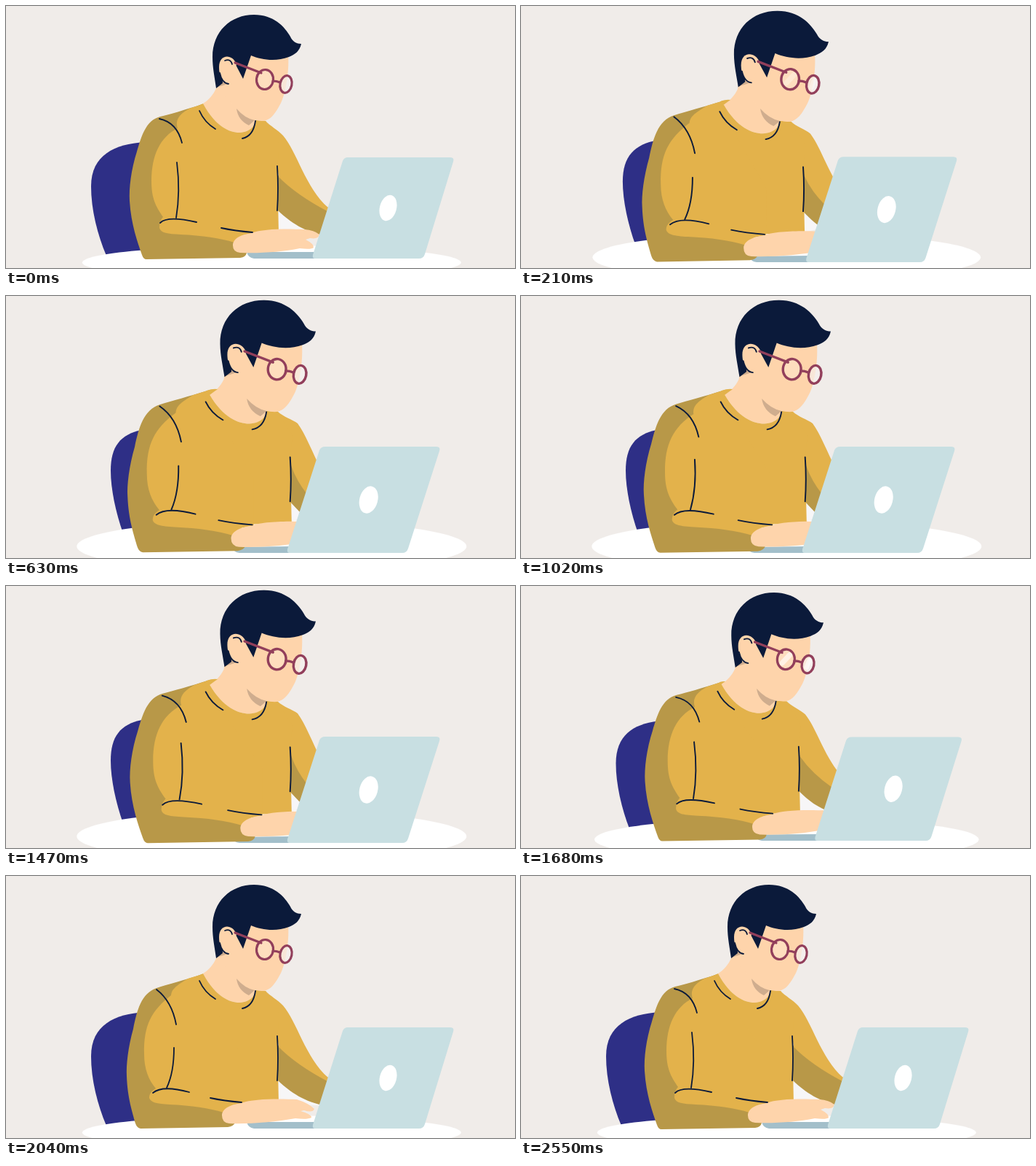
These frames come from a looping animation (700x360 px, 2.7 s). An HTML page with a canvas:

```html
<!DOCTYPE html>
<html lang="en">
<head>
<meta charset="utf-8">
<title>Working at a laptop</title>
<style>
  html, body { margin: 0; width: 100%; height: 100%; overflow: hidden; background: #f0ece9; }
  canvas { display: block; }
</style>
</head>
<body>
<canvas id="stage" width="700" height="360"></canvas>
<script>
const ctx = document.getElementById('stage').getContext('2d');
const LOOP = 2700, STEP = 30;
const SHIRT = '#e3b24b', SHADE = '#b89848', SKIN = '#fed4ab', NAVY = '#0b1a3a',
      CHAIR = '#2e2f86', SCREEN = '#c8dfe2', BASE = '#a3bfca', FRAME = '#923f5b';

const lerp = (a, b, k) => a + (b - a) * k;
const progress = (t, start, length) => Math.min(1, Math.max(0, (t - start) / length));
const smooth = k => k * k * (3 - 2 * k);

// Blend two path strings that share the same commands.
function mix(a, b, k) {
  const target = b.match(/-?[\d.]+/g);
  let i = 0;
  return a.replace(/-?[\d.]+/g, n => lerp(+n, +target[i++], k).toFixed(2));
}

function fill(color, path) {
  ctx.fillStyle = color;
  ctx.fill(new Path2D(path));
}

function line(path, color = NAVY, width = 1.8) {
  ctx.strokeStyle = color;
  ctx.lineWidth = width;
  ctx.stroke(new Path2D(path));
}

function oval(color, x, y, rx, ry, turn = 0, outline) {
  ctx.beginPath();
  ctx.ellipse(x, y, rx, ry, turn, 0, 2 * Math.PI);
  ctx.fillStyle = color;
  ctx.fill();
  if (outline) {
    ctx.strokeStyle = outline;
    ctx.lineWidth = 3.2;
    ctx.stroke();
  }
}

// Draw a part whose transform grows from identity to the given matrix.
function part(matrix, k, draw) {
  ctx.save();
  ctx.transform(...matrix.map((v, i) => lerp([1, 0, 0, 1, 0, 0][i], v, k)));
  draw();
  ctx.restore();
}

const HEAD = [1.08, .012, .015, 1.05, -13.3, -10.9];
const GLASSES = [1, 0, 0, 1, 0, 1.2];
const TORSO = [1.085, 0, 0, 1, -14, 1.4];
const ARM = [1.077, 0, 0, 1.05, -12, -12.15];

// How far the viewpoint has moved in.
function leanAt(t) {
  return t < 1350 ? 1 - (1 - progress(t, 0, 450)) ** 3
                  : 1 - smooth(progress(t, 1470, 420));
}

// How far the near arm is pulled back: [start, length, direction].
const ARM_MOVES = [[0, 150, 1], [600, 150, -1], [900, 240, 1],
                   [1350, 150, -1], [1890, 150, 1], [2400, 150, -1]];
const reachAt = t => ARM_MOVES.reduce(
  (sum, [start, length, dir]) => sum + dir * smooth(progress(t, start, length)), 0);

function drawTorso() {
  fill(SKIN, 'M291 100L289 113C285 122 279 129 271 134C288 166 308 174 321 174C337 173 342 164 343 156L340 110Z');
  fill(SHIRT, 'M244 146L271 134C288 166 308 174 321 174C337 173 342 164 343 157L357 158L376 190L373 220L375 312L215 312L212 200Z');
}

function drawTorsoLines() {
  line('M266 144Q273 160 288 169');
  line('M343 158Q340 179 325 182');
  line('M373 220Q375 250 373 281');
}

function drawHead() {
  fill(SKIN, 'M294 62L388 66C390 90 384 125 376 137C368 152 361 158 352 158Q332 157 317 141L289 112Z');
  fill('#cfad8e', 'M317 141Q328 154 342 157L334 164Q319 157 317 141Z');
  fill('#cfad8e', 'M289 112L297 104L305 107Z');
  fill(NAVY, 'M289 113C287 98 284 85 284 70C284 35 309 12 341 12C368 12 383 28 391 42C394 49 400 52 406 52C404 62 397 67 389 70C371 77 351 74 337 68L326 100L315 79L297 85L298 106Z');
  fill(SKIN, 'M317 80C311 65 293 66 293 84C293 97 298 107 307 107Z');
  line('M301 75Q309 72 311 80');
  line('M294 92Q297 106 306 107');
}

function drawGlasses(glint) {
  oval('rgba(255,236,212,.45)', 356, 101, 11.5, 13.5, .12, FRAME);
  oval('rgba(245,240,236,.7)', 385, 107.5, 8, 12, .2, FRAME);
  const shine = `rgba(255,255,255,${.6 * glint})`;
  line('M351 106L361 95', shine, 7);
  line('M383 112L387 102', shine, 6);
  line('M315 78L351 92', FRAME, 3.2);
  line('M367 103Q372 103 377 105', FRAME, 3.2);
}

function drawFarArm(lean) {
  fill('#f7f6f7', mix('M374 280L440 316L374 312Z', 'M391 282L410 303L391 311Z', lean));
  fill(SHADE, mix('M373 232L443 277L440 316C410 310 392 298 374 281Z',
                  'M390 230L432 240L415 306C407 300 399 292 391 283Z', lean));
  fill(SHIRT, mix('M343 157L357 158C362 164 375 171 381 178C400 200 412 250 443 277L442 282Q400 260 375 235L373 220Z',
                  'M358 158L374 159C380 165 394 170 401 175C412 190 420 212 433 238L414 272Q400 255 392 233L390 219Z', lean));
}

function drawNearArm(reach) {
  const pose = (near, back) => mix(near, back, reach);
  fill(SHADE, pose(
    'M270 135C245 143 225 149 212 152C192 157 186 180 180 200C172 225 169 250 170 268C172 300 181 325 187 342Q189 348 193 348L322 346Q330 345 331 339L320 330L320 310L250 240Z',
    'M270 135C245 143 222 149 207 154C186 161 180 185 175 210C168 235 165 260 166 275C167 305 174 325 178 340Q180 346 185 347L305 345Q313 344 315 339L305 330L305 310L250 240Z'));
  fill(SHIRT, pose(
    'M252 141C236 150 233 158 236 168C212 180 200 205 200 240C200 265 206 275 216 290C212 294 211 300 211 305C213 312 222 313 240 314Q285 316 314 325L326 315L340 312L340 250L270 150L270 135Z',
    'M250 141C232 152 228 156 227 164C200 185 189 205 190 245C190 265 196 280 206 292C199 296 197 300 197 305C199 311 207 313 225 314Q270 316 299 325L311 315L326 312L326 250L270 150L270 135Z'));
  fill(SKIN, pose(
    'M312 329C312 319 324 314 338 312C352 306 385 306 410 307Q424 308 431 314Q430 321 418 319L412 321Q424 327 423 332Q420 335 404 333C380 338 350 340 322 339Q312 338 312 329Z',
    'M297 329C297 319 310 314 324 312C338 306 375 306 400 307Q416 312 424 320Q422 326 410 322L405 323Q420 327 420 332Q414 335 398 333C370 338 335 341 307 340Q297 339 297 329Z'));
  line(pose('M211 155Q235 160 242 188', 'M207 156Q228 172 234 204'));
  line(pose('M235 215Q240 255 234 291', 'M231 236Q231 270 221 291'));
  line(pose('M212 298Q222 288 262 297', 'M202 298Q215 287 252 297'));
  line(pose('M296 305Q315 309 339 311', 'M281 305Q300 309 324 311'));
}

function drawScreen(lean) {
  fill(SCREEN, mix('M470 208L611 208Q617 208 615 214L576 341Q574 347 568 347L425 347Q421 347 422 342L463 213Q465 208 470 208Z',
                   'M439 207L592 207Q598 207 596 213L553 347Q551 353 545 353L390 353Q386 353 387 348L431 212Q433 207 439 207Z', lean));
  oval('#fff', lerp(525.5, 498.7, lean), lerp(277.5, 280, lean),
       lerp(11.5, 12.5, lean), lerp(18, 19, lean), .26);
}

function draw(t) {
  const lean = leanAt(t), reach = reachAt(t);
  ctx.fillStyle = '#f0ece9';
  ctx.fillRect(0, 0, 700, 360);
  ctx.lineCap = 'round';
  fill(CHAIR, mix('M190 187C150 190 117 204 117 248C117 280 126 315 138 343L200 343Z',
                  'M187 184C157 190 144 207 144 240C144 265 151 298 161 326L200 326Z', lean));
  oval('#fff', 365.3, lerp(352.5, 344, lean), lerp(260.5, 268, lean), lerp(23.5, 36, lean));
  drawFarArm(lean);
  part(TORSO, lean, drawTorso);
  part(HEAD, lean, () => {
    drawHead();
    part(GLASSES, lean, () => drawGlasses(4 * lean * (1 - lean)));
  });
  fill(BASE, mix('M331 338L430 338L430 347L341 347Q333 346 331 338Z',
                 'M311 345L395 344L395 353L321 353Q313 352 311 345Z', lean));
  part(ARM, lean, () => drawNearArm(reach));
  fill(SHIRT, mix('M264 140L271 134Q271 134 271 134L271 134Z',
                  'M268 140L276 130Q284 127 291 128L280 136Z', lean));
  part(TORSO, lean, drawTorsoLines);
  drawScreen(lean);
}

const begin = performance.now();
function tick() {
  const t = (performance.now() - begin) % LOOP;
  draw(t - t % STEP);
  requestAnimationFrame(tick);
}
tick();
</script>
</body>
</html>
```
